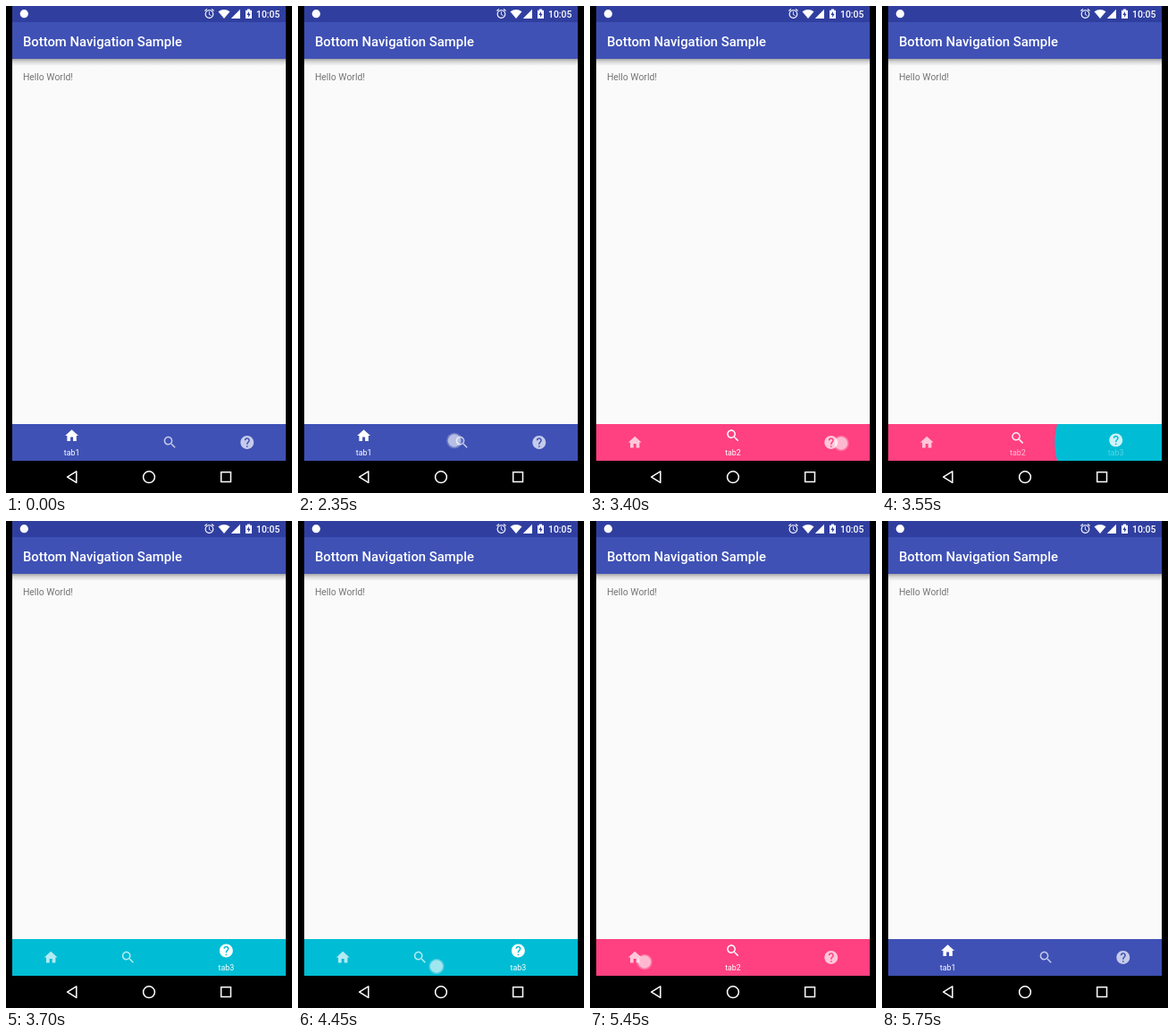
An HTML page for the animation above (5.8 s loop, 320 px wide and 544 px high).

```html
<!DOCTYPE html>
<html lang="en">
<head>
<meta charset="utf-8">
<title>Bottom navigation</title>
<style>
  html, body { margin: 0; width: 100%; height: 100%; overflow: hidden; background: #000; }
  svg { display: block; width: 320px; height: 544px; font-family: Roboto, sans-serif; }
  .label { font-size: 8.9px; fill: #fff; text-anchor: middle; }
</style>
</head>
<body>
<svg viewBox="0 0 320 544">
  <defs>
    <linearGradient id="shade" x1="0" y1="0" x2="0" y2="1">
      <stop offset="0" stop-opacity=".36"/>
      <stop offset=".35" stop-opacity=".16"/>
      <stop offset="1" stop-opacity="0"/>
    </linearGradient>
    <clipPath id="barClip"><rect x="7" y="467" width="306" height="41"/></clipPath>
  </defs>

  <rect width="320" height="544"/>
  <rect x="7" width="306" height="508" fill="#fafafa"/>
  <rect x="7" y="59" width="306" height="8" fill="url(#shade)"/>
  <rect x="7" width="306" height="18" fill="#303f9f"/>
  <rect x="7" y="18" width="306" height="41" fill="#3f51b5"/>

  <!-- status bar -->
  <g fill="#fff">
    <circle cx="20.3" cy="8.7" r="4.6"/>
    <path transform="translate(221 2) scale(.54)" d="M22 5.72l-4.6-3.86-1.29 1.53 4.6 3.86zM7.88 3.39L6.6 1.86 2 5.71l1.29 1.53zM12.5 8H11v6l4.75 2.85.75-1.23-4-2.37zM12 4c-4.97 0-9 4.03-9 9s4.02 9 9 9c4.97 0 9-4.03 9-9s-4.03-9-9-9zm0 16c-3.87 0-7-3.13-7-7s3.13-7 7-7 7 3.13 7 7-3.13 7-7 7z"/>
    <path d="M237.5 6.3Q244 1.8 250.5 6.3L244 14z"/>
    <path d="M262 3.8V14H251.8z"/>
    <path d="M268 4.8h2v-1.2h3v1.2h2V14h-7z"/>
    <path d="M272 6l-2.6 4h1.7v2.8l2.6-4H272z" fill="#303f9f"/>
    <text x="280" y="13" font-size="10.4" font-weight="500">10:05</text>
    <text x="18.9" y="44.6" font-size="14.86" font-weight="500">Bottom Navigation Sample</text>
  </g>
  <text x="18.9" y="82.8" font-size="10.4" fill="#757575">Hello World!</text>

  <!-- tab bar -->
  <g clip-path="url(#barClip)">
    <rect id="bar" x="7" y="467" width="306" height="41"/>
    <circle id="reveal" cy="487.5"/>
    <g class="tab">
      <path class="icon" fill="#fff" d="M10 20v-6h4v6h5v-8h3L12 3 2 12h3v8z"/>
      <text class="label" y="501.5">tab1</text>
    </g>
    <g class="tab">
      <path class="icon" fill="#fff" d="M15.5 14h-.79l-.28-.27C15.41 12.59 16 11.11 16 9.5 16 5.91 13.09 3 9.5 3S3 5.91 3 9.5 5.91 16 9.5 16c1.61 0 3.09-.59 4.23-1.57l.27.28v.79l5 4.99L20.49 19zm-6 0C7.01 14 5 11.99 5 9.5S7.01 5 9.5 5 14 7.01 14 9.5 11.99 14 9.5 14z"/>
      <text class="label" y="501.5">tab2</text>
    </g>
    <g class="tab">
      <path class="icon" fill="#fff" d="M12 2C6.48 2 2 6.48 2 12s4.48 10 10 10 10-4.48 10-10S17.52 2 12 2zm1 17h-2v-2h2zm2.07-7.75l-.9.92C13.45 12.9 13 13.5 13 15h-2v-.5c0-1.1.45-2.1 1.17-2.83l1.24-1.26c.37-.36.59-.86.59-1.41 0-1.1-.9-2-2-2s-2 .9-2 2H8c0-2.21 1.79-4 4-4s4 1.79 4 4c0 .88-.36 1.68-.93 2.25z"/>
      <text class="label" y="501.5">tab3</text>
    </g>
    <g id="touch" fill="#fff">
      <circle r="8.8" opacity=".25"/>
      <circle r="7.2" opacity=".5"/>
    </g>
  </g>

  <!-- system buttons -->
  <g fill="none" stroke="#fff" stroke-width="1.5">
    <path d="M78.8 519.8v12.6L68.6 526.1z" stroke-linejoin="round"/>
    <circle cx="160" cy="526.2" r="6.4"/>
    <rect x="240.7" y="520.7" width="10.8" height="10.8"/>
  </g>
</svg>

<script>
const LOOP = 5800, STEP = 50;
const REVEAL_MS = 300, SHIFT_MS = 250;
const LEFT = 7, WIDTH = 306, NARROW = 86.4;
const WIDE = WIDTH - 2 * NARROW;
const ICON_SCALE = 0.7435;
const COLORS = ['#3f51b5', '#ff4081', '#00bcd4'];

// down: finger lands; start: bar begins to change
const TAPS = [
  { down: 2350, start: 2350, from: 0, to: 1, x: 175, y: 485.5 },
  { down: 3400, start: 3450, from: 1, to: 2, x: 281, y: 488.5 },
  { down: 4450, start: 4475, from: 2, to: 1, x: 155, y: 497.5 },
  { down: 5450, start: 5500, from: 1, to: 0, x: 61, y: 492.5 }
];
const REST = { down: 0, start: -1000, from: 0, to: 0, x: 0, y: 0 };

const bar = document.getElementById('bar');
const reveal = document.getElementById('reveal');
const touch = document.getElementById('touch');
const tabs = [...document.querySelectorAll('.tab')].map(el => ({
  icon: el.querySelector('.icon'),
  label: el.querySelector('.label')
}));

const ease = p => (1 - Math.cos(Math.PI * Math.min(1, Math.max(0, p)))) / 2;

function restCenter(tab, active) {
  const before = tab * NARROW + (active < tab ? WIDE - NARROW : 0);
  return LEFT + before + (tab === active ? WIDE : NARROW) / 2;
}

function drawTabs(tap, shift) {
  tabs.forEach(({ icon, label }, i) => {
    const a = restCenter(i, tap.from), b = restCenter(i, tap.to);
    const x = a + (b - a) * shift;
    const on = (i === tap.from ? 1 - shift : 0) + (i === tap.to ? shift : 0);
    const y = 487.5 - 7.5 * on;
    icon.setAttribute('transform',
      `translate(${x} ${y}) scale(${ICON_SCALE}) translate(-12 -12)`);
    icon.setAttribute('opacity', 0.7 + 0.3 * on);
    label.setAttribute('x', x);
    label.setAttribute('opacity', on);
  });
}

function draw(time) {
  const t = Math.floor((time % LOOP) / STEP) * STEP;
  const tap = TAPS.filter(s => s.down <= t).pop() || REST;
  const age = t - tap.start;
  const done = age >= REVEAL_MS;

  bar.setAttribute('fill', COLORS[done ? tap.to : tap.from]);
  reveal.setAttribute('fill', COLORS[tap.to]);
  reveal.setAttribute('cx', restCenter(tap.to, tap.from));
  reveal.setAttribute('r', done ? 0 : WIDTH * ease(age / REVEAL_MS));
  drawTabs(tap, ease(age / SHIFT_MS));

  touch.setAttribute('transform', `translate(${tap.x} ${tap.y})`);
  touch.setAttribute('visibility', age <= 0 ? 'visible' : 'hidden');
}

const origin = performance.now();
function tick() {
  draw(performance.now() - origin);
  requestAnimationFrame(tick);
}
tick();
</script>
</body>
</html>
```
